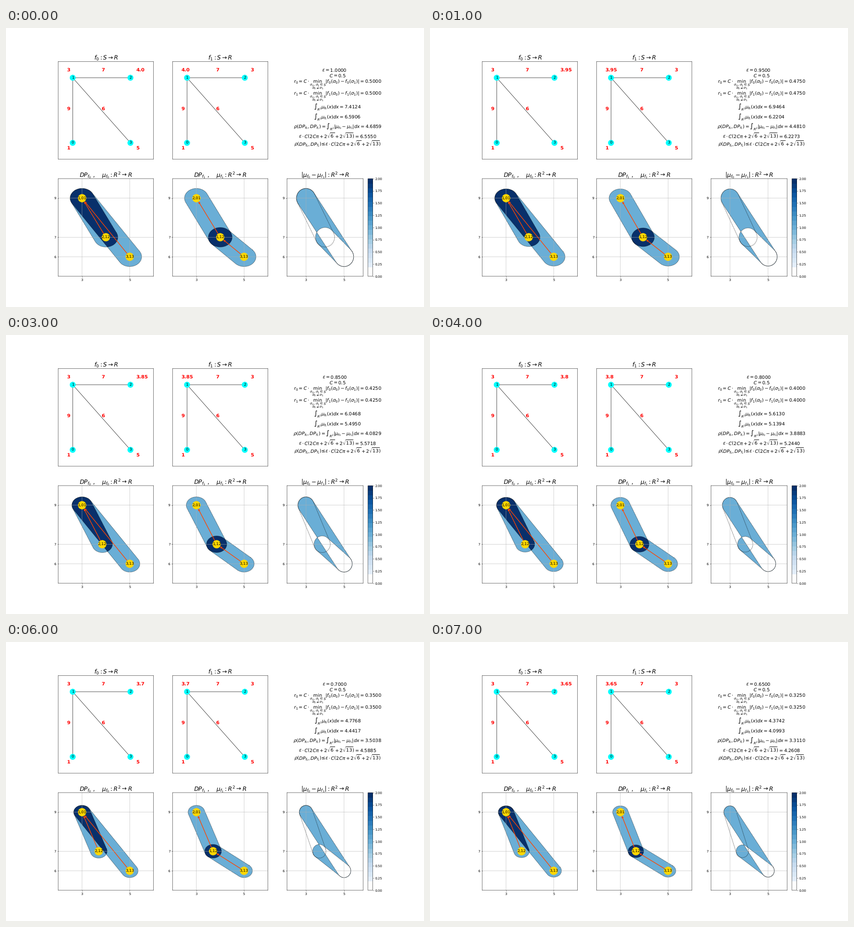
A matplotlib script for the animation above (8 s loop, 917x611 px).

```python
import numpy as np
import matplotlib.pyplot as plt
from matplotlib.animation import FuncAnimation
from matplotlib.cm import ScalarMappable
from matplotlib.colors import ListedColormap, Normalize
from matplotlib.patches import FancyArrowPatch, Polygon

# keep lines and glyphs at their exact sub-pixel places
plt.rcParams.update({'path.snap': False, 'text.hinting': 'none'})

W, H = 917, 611
DPI = 50.9375
C = 0.5
BLUES = plt.get_cmap('Blues')
LIGHT, DARK = BLUES(0.5), BLUES(1.0)

fig, axes = plt.subplots(2, 3, figsize=((W + 1e-4) / DPI, (H + 1e-4) / DPI),
                         dpi=DPI, facecolor='white')
(graph0, graph1, notes), (dia0, dia1, diff) = axes
moving = []  # artists rebuilt for every frame


# ---------- geometry ----------

def stadium(p, q, r):
    """Clockwise outline of all points within r of the segment pq."""
    phi = np.arctan2(q[1] - p[1], q[0] - p[0])
    turn = np.linspace(np.pi / 2, -np.pi / 2, 129)

    def cap(c, a):
        return np.column_stack([c[0] + r * np.cos(a), c[1] + r * np.sin(a)])

    return np.vstack([cap(q, phi + turn), cap(p, phi + np.pi + turn)])


def span(pts, y):
    """Left and right edge of a convex clockwise outline at each height y."""
    pts = np.roll(pts, -pts[:, 1].argmax(), axis=0)
    low = pts[:, 1].argmin()
    right = pts[low::-1]
    left = np.vstack([pts[low:], pts[:1]])
    return (np.interp(y, left[:, 1], left[:, 0]),
            np.interp(y, right[:, 1], right[:, 0]))


def overlap(s, t):
    low = max(s[:, 1].min(), t[:, 1].min())
    high = min(s[:, 1].max(), t[:, 1].max())
    step = (high - low) / 100000
    y = low + step * (np.arange(100000) + 0.5)
    l1, r1 = span(s, y)
    l2, r2 = span(t, y)
    return step * np.maximum(np.minimum(r1, r2) - np.maximum(l1, l2), 0).sum()


def dist(p, q):
    return np.hypot(q[0] - p[0], q[1] - p[1])


# ---------- still parts ----------

def set_title(ax, s):
    ax.set_title(s, fontsize=18, y=1, pad=5)


def dots(ax, points, size, color):
    # one colour per dot keeps them off the whole-pixel marker grid
    return ax.scatter(*zip(*points), s=size, c=[color] * len(points),
                      linewidths=1, zorder=2)


def centred(ax, x, y, s):
    return ax.text(x, y, s, fontsize=12, ha='center', va='center')


def red_label(ax, x, y, s):
    return ax.text(x, y, s, fontsize=15, color='red', weight='bold')


def draw_graph(ax, title):
    ax.set(xlim=(-0.25, 1.4), ylim=(-0.25, 1.25), xticks=[], yticks=[])
    set_title(ax, title)
    nodes = [(0, 0), (0, 1), (1, 1), (1, 0)]
    for i, j in [(0, 1), (1, 2), (1, 3)]:
        ax.plot(*zip(nodes[i], nodes[j]), color='black', lw=1, zorder=1)
    dots(ax, nodes, 300, 'cyan')
    for i, (x, y) in enumerate(nodes):
        centred(ax, x, y, str(i))
    for x, y, s in [(0.5, 1.1, '7'), (-0.1, 0.5, '9'), (0.5, 0.5, '6'),
                    (-0.1, -0.1, '1'), (1.1, -0.1, '5')]:
        red_label(ax, x, y, s)


def setup_plane(ax, title):
    ax.set(xlim=(2, 6), ylim=(5, 10), xticks=[3, 5], yticks=[6, 7, 9])
    set_title(ax, title)
    ax.grid(True)


def note(x, y, s='', size=14.4):
    return fig.text(x / W, 1 - y / H, s, fontsize=size, ha='center',
                    va='baseline')


draw_graph(graph0, r'$f_0:S\rightarrow R$')
draw_graph(graph1, r'$f_1:S\rightarrow R$')
setup_plane(dia0, r'$DP_{f_0}$ ,    $\mu_{f_0}:R^2\rightarrow R$')
setup_plane(dia1, r'$DP_{f_1}$ ,    $\mu_{f_1}:R^2\rightarrow R$')
setup_plane(diff, r'$|\mu_{f_0}-\mu_{f_1}|:R^2\rightarrow R$')
notes.axis('off')

steps = BLUES(np.linspace(0, 1, 21))
steps[:2] = 1
fig.colorbar(ScalarMappable(Normalize(0, 2), ListedColormap(steps)),
             ax=diff, ticks=np.arange(0, 2.01, 0.25))

MID = 727.3
eps_note = note(720.8, 96)
note(MID, 107.5, r'$C=0.5$')
rows = [note(MID, y) for y in (119.5, 145.2, 176, 197.7, 218.7, 240.4)]
BOUND = r'C(2C\pi+2\sqrt{6}+2\sqrt{13})'
PAIR = r'\rho(DP_{f_0},DP_{f_1})'
note(MID, 258.2, rf'${PAIR}$≤$\varepsilon\cdot {BOUND}$')
for y in (134, 159.7):
    note(684.3, y, r'$\sigma_0\neq\sigma_1$', 14.4 * 0.7)

labels = [red_label(graph0, -0.1, 1.1, '3'), red_label(graph0, 1.1, 1.1, ''),
          red_label(graph1, -0.1, 1.1, ''), red_label(graph1, 1.1, 1.1, '3')]


# ---------- moving parts ----------

def fill(ax, pts, color, clip=None):
    patch = ax.add_patch(Polygon(pts, fc=color, ec='none', zorder=1))
    if clip is not None:
        patch.set_clip_path(Polygon(clip).get_path(), ax.transData)
    moving.append(patch)


def outline(ax, pts):
    moving.append(ax.add_patch(Polygon(pts, fill=False, ec='black', ls=':',
                                       lw=1.5, zorder=1)))


def paint(ax, s, t, both):
    """Fill two stadiums, colouring their common part differently."""
    fill(ax, s, LIGHT)
    fill(ax, t, LIGHT)
    fill(ax, t, both, clip=s)
    outline(ax, s)
    outline(ax, t)


def draw_arrows(ax, points, names, arrows):
    for tail, head in arrows:
        moving.append(ax.add_patch(FancyArrowPatch(
            tail, head, arrowstyle='-|>', mutation_scale=10, color='orangered',
            lw=2, shrinkA=12.25, shrinkB=12.25, zorder=1)))
    moving.append(dots(ax, points, 600, 'gold'))
    for (x, y), s in zip(points, names):
        moving.append(centred(ax, x, y, s))


def min_row(i, r):
    return (rf'$r_{i}=C\cdot\min_{{\sigma_0,\sigma_1\in S}}'
            rf'|f_{i}(\sigma_0)-f_{i}(\sigma_1)|={r:.4f}$')


def update(k):
    while moving:
        moving.pop().remove()
    eps = 1 - 0.05 * k
    r = C * eps
    a, b, c = (3, 9), (3 + eps, 7), (5, 6)
    ab, ac, bc = stadium(a, b, r), stadium(a, c, r), stadium(b, c, r)

    paint(dia0, ab, ac, DARK)
    draw_arrows(dia0, (a, b, c), ('1,01', '2,12', '3,13'), [(b, a), (c, a)])
    paint(dia1, ab, bc, DARK)
    draw_arrows(dia1, (a, b, c), ('2,01', '1,12', '3,13'), [(b, a), (c, b)])
    paint(diff, ac, bc, 'white')
    outline(diff, ab)

    value = str(round(3 + eps, 2))
    labels[1].set_text(value)
    labels[2].set_text(value)

    caps = 2 * np.pi * r**2
    mass0 = caps + 2 * r * (dist(a, b) + dist(a, c))
    mass1 = caps + 2 * r * (dist(a, c) + dist(b, c))
    rho = mass1 - overlap(ac, bc)
    bound = eps * C * (2 * C + 2 * np.sqrt(6) + 2 * np.sqrt(13))
    eps_note.set_text(rf'$\varepsilon={eps:.4f}$')
    lines = [
        min_row(0, r),
        min_row(1, r),
        rf'$\int_{{R^2}}\mu_{{f_0}}(x)dx={mass0:.4f}$',
        rf'$\int_{{R^2}}\mu_{{f_1}}(x)dx={mass1:.4f}$',
        rf'${PAIR}=\int_{{R^2}}|\mu_{{f_0}}-\mu_{{f_1}}|dx={rho:.4f}$',
        rf'$\varepsilon\cdot {BOUND}={bound:.4f}$',
    ]
    for row, s in zip(rows, lines):
        row.set_text(s)
    return moving


anim = FuncAnimation(fig, update, frames=8, interval=1000, repeat=True,
                     repeat_delay=0, init_func=lambda: [], blit=False)
plt.show()
```
